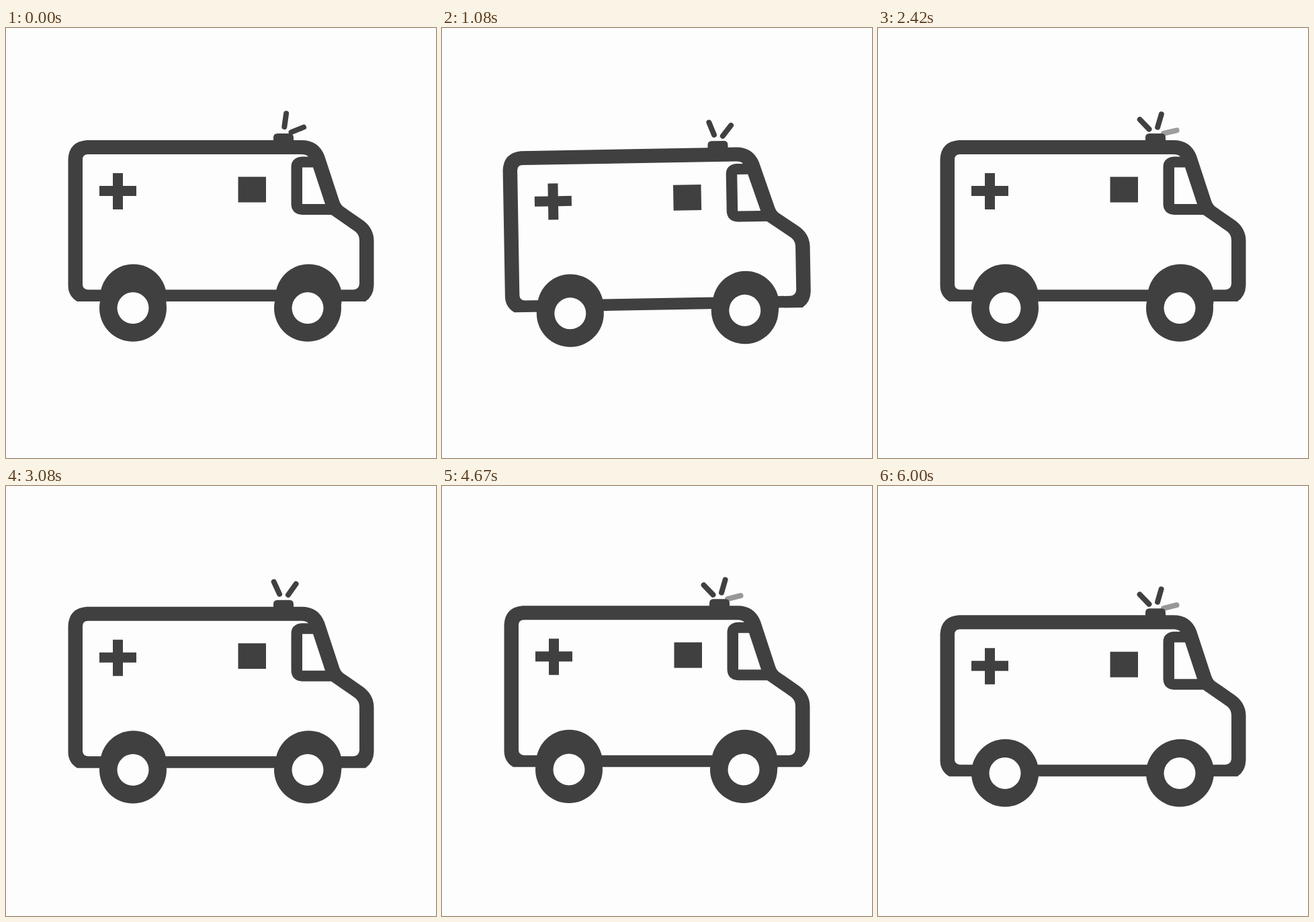
An HTML page for the animation above (6.08 s loop, 640x640 px).

```html
<!DOCTYPE html>
<html lang="en">
<head>
<meta charset="utf-8">
<title>Ambulance</title>
<style>
  html, body { margin: 0; width: 100%; height: 100%; overflow: hidden; background: #fdfdfd; }
  svg { display: block; width: 100vw; height: 100vh; }
</style>
</head>
<body>
<svg viewBox="0 0 640 640" fill="#404041">
  <defs>
    <path id="ray" d="M0-13V-33" stroke="#404041" stroke-width="8" stroke-linecap="round"/>
    <circle id="arch" cy="401" r="49.5"/>
    <g id="wheel">
      <circle cy="427.5" r="50"/>
      <circle cy="427.5" r="23.5" fill="#fdfdfd"/>
    </g>
  </defs>
  <g id="van">
    <g id="body">
      <path fill-rule="evenodd" d="
        M120 167H440Q465 167 474 190L496 257Q498 263 502 266L528 284Q547 296 547.5 316
        V383Q547 399 535 407H106Q92.5 399 92.5 383V195Q94 169 120 167Z
        M122 188H440Q447 188 450 191.5H440Q424.5 193 424.5 207V262Q425 277 441 278H484
        L520 303Q526 308 526 316V381Q525 389 517 389.5H122Q114 389 114 381V196Q114 188 122 188Z
        M441 207.5H457L475 262H441Z"/>
      <use href="#arch" x="189.5"/>
      <use href="#arch" x="450.5"/>
      <path d="M159 216h15v19h20v15h-20v20h-15v-20h-20v-15h20z"/>
      <rect x="345.5" y="221.5" width="41.5" height="38"/>
      <path d="M398 168v-5q0-6 6-6h18q6 0 6 6v5z"/>
      <g id="rays" transform="translate(412.5 160)">
        <use href="#ray"/>
        <use href="#ray"/>
        <use href="#ray"/>
      </g>
    </g>
    <g id="wheels">
      <use href="#wheel" x="189"/>
      <use href="#wheel" x="449"/>
    </g>
  </g>
</svg>
<script>
  const LOOP = 6080, FPS = 12, LAST = 72, BOUNCE = 0.4;
  const get = id => document.getElementById(id);
  const van = get('van'), body = get('body'), wheels = get('wheels');
  const rays = [...get('rays').children];

  const clamp = x => Math.max(0, Math.min(1, x));
  const place = (el, transform) => el.setAttribute('transform', transform);

  // Rays sweep clockwise, fade out on the right, then come to rest
  function drawRays(sec) {
    const turn = 8 + 28.3 * sec + 13 * clamp(sec - 3.08);
    const mid = Math.min(136, turn) % 60;
    rays.forEach((ray, i) => {
      let a = mid + (i - 1) * 60;
      if (a < -45) a += (a + 45) * 0.7;
      const born = i > 0 || sec > 0.3;
      place(ray, `rotate(${a})`);
      ray.setAttribute('opacity', born ? clamp((84 - a) / 15) : 0);
    });
  }

  function draw(ms) {
    const n = Math.min(LAST, Math.floor((ms + 4) * FPS / 1000));
    const sec = n / FPS;
    // Each bounce starts high and falls; the last pose rests at the bottom
    const fall = n === LAST ? 1 : (sec / BOUNCE + 1e-6) % 1;
    const tilt = -Math.sin(Math.PI * clamp((sec - 0.35) / 1.45));
    place(van, `rotate(${tilt} 320 320)`);
    place(body, `translate(0 ${25.2 * fall ** 2})`);
    place(wheels, `translate(0 ${10.7 * (fall ** 1.8 - 1)})`);
    drawRays(sec);
  }

  const start = performance.now();
  function tick() {
    draw((performance.now() - start) % LOOP);
    requestAnimationFrame(tick);
  }
  draw(0);
  requestAnimationFrame(tick);
</script>
</body>
</html>
```
